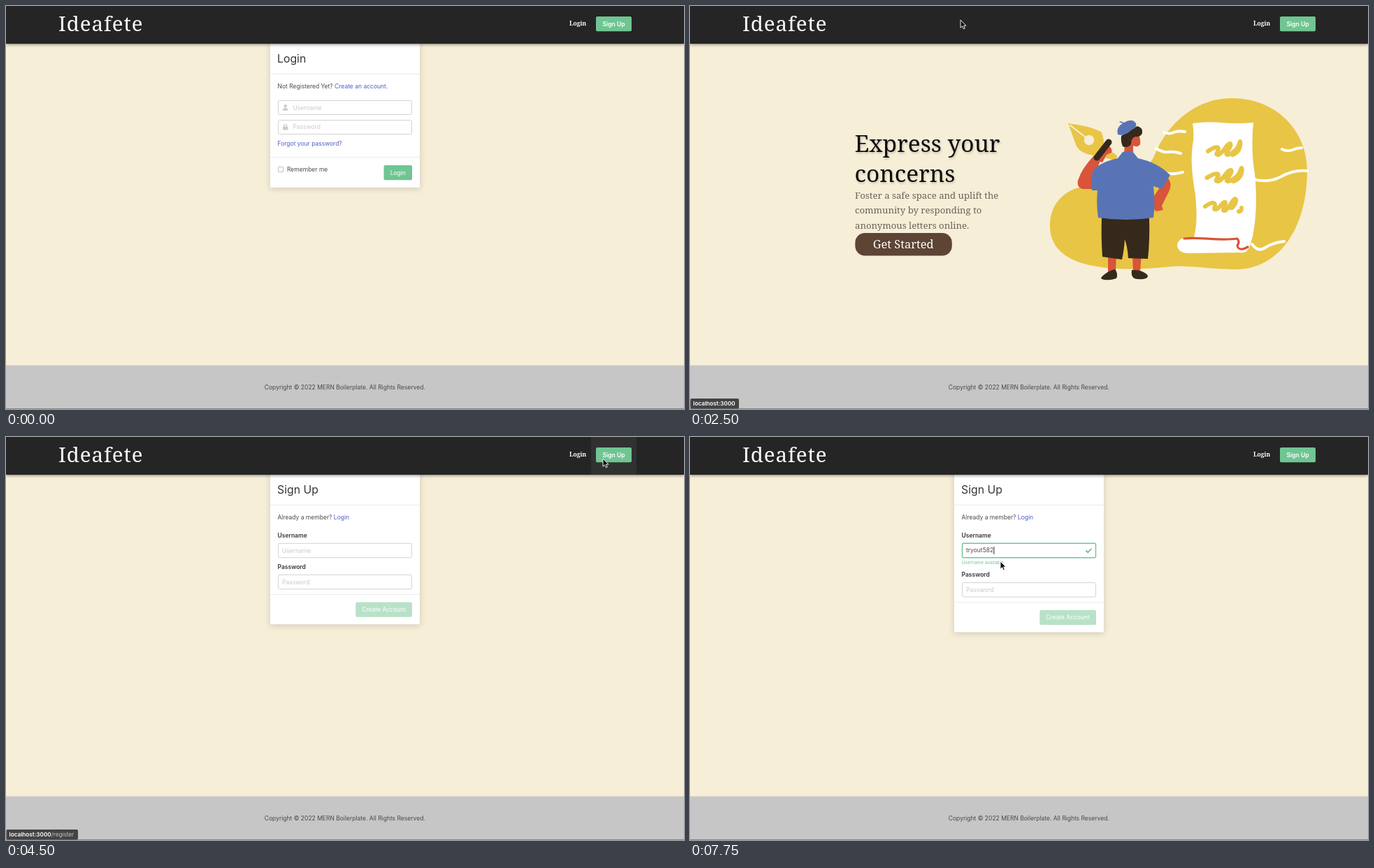
These frames come from a looping animation (970 by 577 pixels, 8000 ms). An HTML page:

```html
<!DOCTYPE html>
<html lang="en">
<head>
<meta charset="utf-8">
<title>Login and sign up</title>
<style>
html, body { margin: 0; width: 100%; height: 100%; overflow: hidden; background: #f7eed8; }
svg { display: block; }
text { font: 8.5px Inter, sans-serif; fill: #4a4a4a; }
.serif { font-family: "Noto Serif", serif; }
.heading { font-size: 33.4px; fill: #0c0b0a; filter: drop-shadow(1px 2px 1.5px rgba(0, 0, 0, .2)); }
.blurb { font-size: 13.2px; fill: #6a6258; }
.title { font-size: 15.8px; fill: #363636; }
.bold { font-weight: 600; fill: #363636; }
.link { fill: #4f5dc4; }
.hint { fill: #c9c9c9; }
.white { fill: #fff; }
.mid { text-anchor: middle; }
.card { fill: #fff; filter: drop-shadow(0 2px 4px rgba(10, 10, 10, .16)); }
.rule { fill: #ebebeb; }
.field { fill: #fff; stroke: #d3d3d3; }
.green { fill: #70c592; }
.icon { fill: #cbcbcb; }
.yellow { fill: #e8c545; }
.blue { fill: #5974b5; }
.red { fill: #d9543a; }
.dark { fill: #35291b; }
.line { fill: none; stroke-width: 4; stroke-linecap: round; stroke-linejoin: round; }
</style>
</head>
<body>
<svg width="970" height="577" viewBox="0 0 970 577">
  <rect width="970" height="577" fill="#f7eed8"/>

  <g id="login">
    <rect class="card" x="378" y="50" width="214" height="210" rx="2"/>
    <text class="title" x="388" y="80.5">Login</text>
    <rect class="rule" x="378" y="97" width="214" height="1"/>
    <text x="388.5" y="118.3">Not Registered Yet? <tspan class="link">Create an account.</tspan></text>
    <rect class="field" x="389.5" y="135.5" width="191" height="20" rx="2"/>
    <circle class="icon" cx="399.7" cy="143.2" r="2.2"/>
    <path class="icon" d="M395.8 149.8q0-3.8 3.9-3.8t3.9 3.8z"/>
    <text class="hint" x="410.5" y="148.6">Username</text>
    <rect class="field" x="389.5" y="163.5" width="191" height="20" rx="2"/>
    <rect class="icon" x="396" y="172.6" width="7.4" height="5" rx=".8"/>
    <path d="M397.7 173v-1.4q0-2 2-2t2 2v1.4" fill="none" stroke="#cbcbcb" stroke-width="1.2"/>
    <text class="hint" x="410.5" y="176.4">Password</text>
    <text class="link" x="388.5" y="199.5">Forgot your password?</text>
    <rect class="rule" x="378" y="216" width="214" height="1"/>
    <rect x="389.5" y="230.5" width="7" height="7" rx=".5" fill="#fff" stroke="#c2c2c2"/>
    <text x="402" y="237.3">Remember me</text>
    <rect class="green" x="540.5" y="228" width="40.5" height="21.3" rx="2"/>
    <text class="white mid" x="560.8" y="241.7">Login</text>
  </g>

  <g id="home">
    <text class="serif heading" x="235.5" y="209">Express your</text>
    <text class="serif heading" x="235.5" y="251.5">concerns</text>
    <text class="serif blurb" x="236" y="276">Foster a safe space and uplift the</text>
    <text class="serif blurb" x="236" y="297.3">community by responding to</text>
    <text class="serif blurb" x="236" y="318.6">anonymous letters online.</text>
    <rect x="236.3" y="325" width="138.5" height="32.6" rx="14" fill="#5d4435"/>
    <text class="serif white mid" style="font-size:16.4px" x="305.2" y="347">Get Started</text>

    <path class="yellow" d="M515 312C516 280 540 258 575 257C620 254 652 240 664 215C685 163 728 132 775 132C840 132 884 180 883 238C882 322 840 377 782 377C740 377 715 371 690 373C650 377 600 380 560 368C530 358 514 340 515 312Z"/>
    <path class="line" stroke="#fff" d="M678 181q8 3 14 0t16 -1M667 204q9 6 17 5t18 2M670 234q8 5 15 6t20 -2M847 205q8 4 15 1t13 -3M806 248q22 6 40 -4t37 -8M804 341q9 12 19 5t27 -9"/>
    <path fill="#fff" d="M719 168Q740 165 760 167T806 167Q802 205 808 240Q813 290 805 330L800 346Q796 355 785 353L712 354Q698 353 697 343Q698 333 708 332L721 331Q727 310 723 270Q715 225 719 200Q722 185 719 168Z"/>
    <path class="line" stroke="#d9543a" style="stroke-width:3.2" d="M707 333C730 330 755 337 783 333Q787 338 783 343Q785 352 798 345"/>
    <g class="line" stroke="#e8c545" style="stroke-width:6">
      <path id="scribble" d="M741 208C748 203 755 200 756 204C756 209 750 213 756 213C763 211 768 196 773 197C776 202 763 212 769 213C777 211 784 205 787 194C789 203 783 211 776 213"/>
      <use href="#scribble" transform="translate(-57 38) scale(1.075 1)"/>
      <path d="M737 287C744 282 750 280 751 284C752 288 747 292 753 291C759 288 763 279 766 281C768 285 759 293 765 293C772 291 775 277 780 276C784 279 776 291 774 289M785 294Q789 295 789 289"/>
    </g>

    <path class="yellow" d="M541 168Q569 171 588 180Q593 190 592 201L611 214L610 222L590 216L577 214Q559 211 553 201Z"/>
    <path d="M543 170L571 192" stroke="#f7eed8" stroke-width="2"/>
    <circle cx="571" cy="192" r="7.2" fill="#f7eed8"/>
    <path class="red" d="M578 214Q560 233 555 250Q553 260 562 262L578 262L580 238L587 222Z"/>
    <path class="red" d="M580 220L584 208L598 200Q605 203 603 210L596 213L590 224Z"/>
    <path class="line" stroke="#35291b" style="stroke-width:9" d="M599 195L582 217"/>
    <path class="red" d="M680 243Q691 251 686 264L675 286L677 292L667 294L663 290L664 272L672 260Z"/>
    <path class="red" d="M598 355h12l-1 26h-11zM633 355h13l-2 25h-10z"/>
    <path class="red" d="M630 185L641 183Q645 189 644 198Q641 203 634 200L634 211L621 211L622 196Z"/>
    <path class="dark" d="M617 186Q630 177 640 172Q648 174 647 182Q645 188 637 187Q631 189 631 198Q626 204 619 201Q616 194 617 186Z"/>
    <path class="blue" d="M612 184Q609 174 619 168L614 166L616 165L621 167Q633 160 638 168Q640 174 631 178Q622 187 612 184Z"/>
    <path class="dark" d="M589 303L657 303Q658 336 655 362L627 361Q626 345 622 334Q621 350 618 363L590 359Q588 330 589 303Z"/>
    <path class="dark" d="M588 389Q597 379 608 377Q613 383 610 390Q598 394 589 391ZM632 378Q648 377 655 386Q656 392 641 391Q630 391 632 378Z"/>
    <path class="blue" d="M619 209L632 207L641 218Q669 224 687 242L675 262L663 258Q666 283 663 303Q625 309 584 303Q581 285 583 264L575 264Q571 238 582 230Q596 221 612 218Z"/>
  </g>

  <g id="signup">
    <rect id="panel" class="card" x="378" y="50" width="214" height="218" rx="2"/>
    <text class="title" x="388" y="80.5">Sign Up</text>
    <rect class="rule" x="378" y="97" width="214" height="1"/>
    <text x="388.5" y="118.3">Already a member? <tspan class="link">Login</tspan></text>
    <text class="bold" x="388.5" y="144">Username</text>
    <rect id="nameField" class="field" x="389.5" y="152.3" width="191" height="20.4" rx="2"/>
    <text id="nameHint" class="hint" x="395" y="165.6">Username</text>
    <text id="name" x="395" y="165.3"></text>
    <rect id="caret" y="157" width="1" height="11" fill="#333"/>
    <g id="valid">
      <path d="M566.5 162.5l2.8 2.8l5-5.3" fill="none" stroke="#62c088" stroke-width="1.8"/>
      <text class="green" style="font-size:6.5px" x="388.5" y="182.3">Username available</text>
    </g>
    <g id="lower">
      <text class="bold" x="388.5" y="188.8">Password</text>
      <rect class="field" x="389.5" y="197.3" width="191" height="20.4" rx="2"/>
      <text class="hint" x="395" y="210.6">Password</text>
      <rect class="rule" x="378" y="225" width="214" height="1"/>
      <rect x="500.3" y="236.5" width="80.7" height="21.3" rx="2" fill="#b8e2c8"/>
      <text class="white mid" x="540.6" y="250.2">Create Account</text>
    </g>
  </g>

  <rect width="970" height="54" fill="#252525" style="filter:drop-shadow(0 1px 2px rgba(0,0,0,.5))"/>
  <rect id="hover" x="837" width="65" height="54" fill="#313131"/>
  <text class="serif" style="font-size:29.5px;letter-spacing:.9px;fill:#fafafa" x="75" y="36">Ideafete</text>
  <text class="serif white" style="font-weight:700" x="806" y="28.3">Login</text>
  <rect class="green" x="844" y="15" width="51" height="21.3" rx="2"/>
  <text class="white mid" style="font-weight:600" x="869.5" y="28.6">Sign Up</text>

  <rect y="514.5" width="970" height="62.5" fill="#c6c6c6"/>
  <rect y="576" width="970" height="1" fill="#858585"/>
  <text class="mid" x="484.8" y="549.2">Copyright © 2022 MERN Boilerplate. All Rights Reserved.</text>

  <g id="status">
    <rect id="statusBox" x=".5" y="562" width="69.5" height="14.5" rx="2" fill="#434343"/>
    <text class="white" style="font-size:8.2px;font-weight:600" x="4.5" y="572">localhost:3000<tspan id="route" fill="#c4c4c4" font-weight="400">/register</tspan></text>
  </g>

  <path id="cursor" d="M0 0V11.2L2.6 8.8L4.4 12.8L6.3 12L4.6 8.1H8Z" fill="#111" stroke="#fff" stroke-width=".9"/>
</svg>
<script>
const $ = id => document.getElementById(id);
const LOOP = 8000, STEP = 250, USER = "tryout582";

// Pointer stops: time, x, y
const POINTER = [
  [500, 814, 4], [750, 640, 44], [1000, 400, 40], [1250, 205, 30], [1500, 147, 31], [2000, 154, 33],
  [2250, 154, 33], [2500, 387, 20], [2750, 560, 22], [3000, 720, 25], [3250, 846, 29], [4000, 854, 29],
  [4250, 854, 29], [4500, 854, 31], [4750, 740, 90], [5000, 520, 150], [5250, 446, 162],
  [7250, 446, 164], [7500, 445, 172], [7750, 444, 178]
];

const show = (id, on) => $(id).style.display = on ? "" : "none";

function pointerAt(t) {
  const i = POINTER.findIndex(p => p[0] > t);
  if (i < 0) return POINTER.at(-1).slice(1);
  const [t0, x0, y0] = POINTER[Math.max(0, i - 1)], [t1, x1, y1] = POINTER[i];
  const k = Math.max(0, (t - t0) / (t1 - t0));
  return [x0 + (x1 - x0) * k, y0 + (y1 - y0) * k];
}

function draw(t) {
  const within = (from, to = LOOP) => t >= from && t < to;
  show("login", t < 2500);
  show("home", within(2500, 4500));
  show("signup", t >= 4500);

  const onSignUp = within(3250, 4750);
  show("hover", onSignUp);
  show("status", within(1750, 3000) || within(3250, 5000));
  show("route", within(3250, 5000));
  $("statusBox").setAttribute("width", t < 3250 ? 69.5 : 102.5);

  const typed = USER.slice(0, Math.max(0, Math.ceil((t - 6000) / 750 * USER.length)));
  const valid = t >= 6500, shift = valid ? 11.3 : 0;
  $("name").textContent = typed;
  show("nameHint", !typed);
  show("valid", valid);
  $("nameField").style.stroke = valid ? "#70c592" : t >= 5250 ? "#6474d2" : "";
  $("nameField").style.strokeWidth = t >= 5250 ? 1.4 : 1;
  $("panel").setAttribute("height", 218.3 + shift);
  $("lower").setAttribute("transform", `translate(0 ${shift})`);
  show("caret", within(5500, 6000) || within(6250, 7250) || within(7750));
  $("caret").setAttribute("x", 395 + (typed ? $("name").getComputedTextLength() + .3 : 0));

  show("cursor", within(500, 6250) || within(7250));
  $("cursor").setAttribute("transform", `translate(${pointerAt(t)})`);
}

function tick() {
  draw(Math.floor(performance.now() % LOOP / STEP) * STEP);
  requestAnimationFrame(tick);
}
tick();
</script>
</body>
</html>
```
